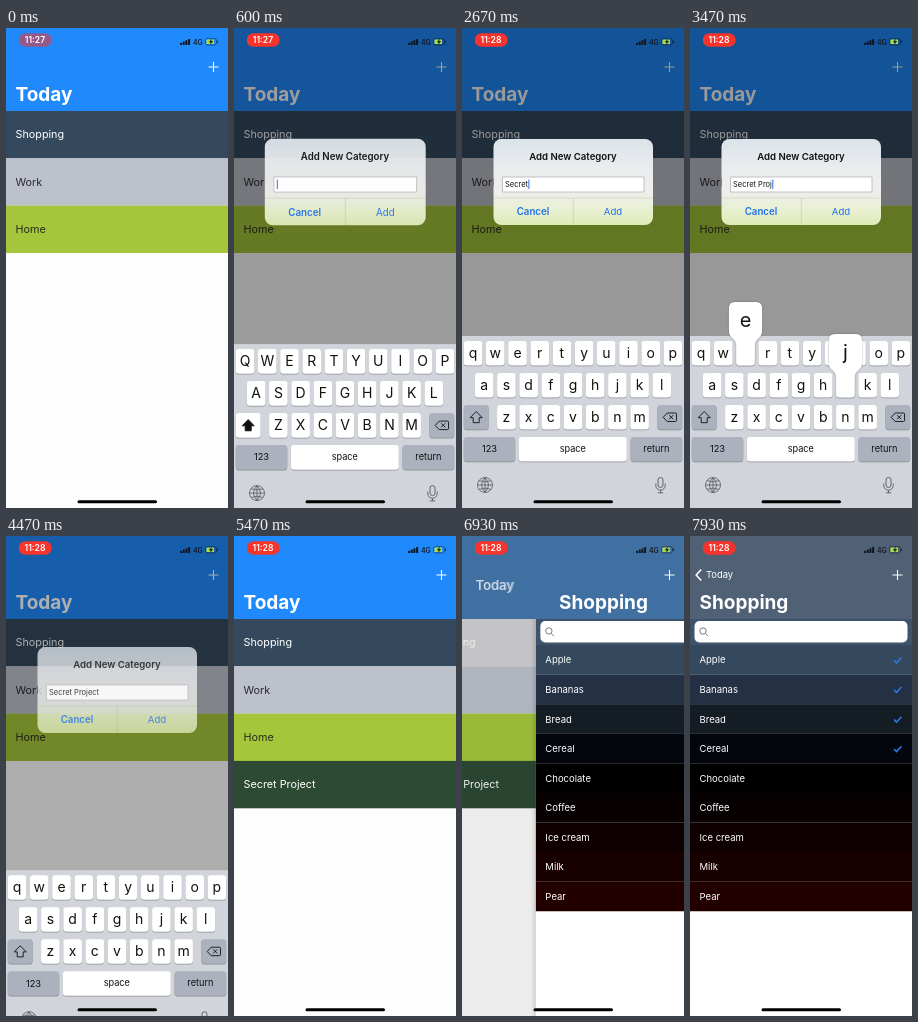
An HTML page with a canvas for the animation above (8000 ms loop, 222 by 480 pixels).

```html
<!DOCTYPE html>
<html lang="en">
<head>
<meta charset="utf-8">
<title>Todo list</title>
<style>
  html, body { margin: 0; width: 100%; height: 100%; overflow: hidden; background: #fff; }
  canvas { display: block; width: 222px; height: 480px; }
</style>
</head>
<body>
<canvas id="stage"></canvas>
<script>
const W = 222, H = 480, LOOP = 8000;
const canvas = document.getElementById('stage');
const c = canvas.getContext('2d');
const dpr = window.devicePixelRatio || 1;
canvas.width = W * dpr;
canvas.height = H * dpr;

const ALERT_IN = 250, ALERT_OUT = 4400, ROW_ADDED = 4830, ROW_TAP = 6640, PUSH = 6740;
const NAV_BLUE = [32, 138, 252], NAV_SLATE = [80, 97, 117];
const CATEGORIES = [
  ['Shopping', '#34495e', '#fff'],
  ['Work', '#bdc1cb', '#2a2a2e'],
  ['Home', '#a5c63b', '#2a2e1c'],
  ['Secret Project', '#2c4a34', '#fff']
];
const ITEMS = [
  ['Apple', '#34495e'], ['Bananas', '#243145'], ['Bread', '#141d24'],
  ['Cereal', '#03060d'], ['Chocolate', '#000'], ['Coffee', '#060000'],
  ['Ice cream', '#0e0000'], ['Milk', '#180000'], ['Pear', '#220000']
];
const CHECKED = 4;
const KEY_ROWS = [['qwertyuiop', 1.8, 313], ['asdfghjkl', 12.9, 345], ['zxcvbnm', 35.1, 377]];
const KEY_W = 18.6, KEY_H = 24.6, KEY_STEP = 22.2;
const TYPED = 'Secret Project';
const PRESSES = [1660, 1900, 2060, 2220, 2350, 2500, 2680, 2930, 3070, 3200, 3330, 3430, 3640, 3820];
const HOLD = 150, INSERT_DELAY = 70;

const mix = (a, b, p) => a + (b - a) * p;
const mixColor = (a, b, p) => `rgb(${a.map((v, i) => mix(v, b[i], p))})`;

// Critically damped spring from 0 to 1.
function spring(now, start, speed) {
  const x = Math.max(0, now - start) / 1000 * speed;
  return 1 - (1 + x) * Math.exp(-x);
}

function rect(x, y, w, h, color) {
  c.fillStyle = color;
  c.fillRect(x, y, w, h);
}

function round(x, y, w, h, r, color) {
  c.fillStyle = color;
  c.beginPath();
  c.roundRect(x, y, w, h, r);
  c.fill();
}

function stroke(path, color, width = 1) {
  c.strokeStyle = color;
  c.lineWidth = width;
  c.stroke(new Path2D(path));
}

// y is the middle of the capitals.
function text(s, x, y, size, color, weight = 400, align = 'left') {
  c.font = `${weight} ${size}px Inter, Roboto, sans-serif`;
  c.textAlign = align;
  c.fillStyle = color;
  c.fillText(s, x, y + size * 0.36);
}

function layer(alpha, draw) {
  if (alpha <= 0) return;
  c.save();
  c.globalAlpha *= Math.min(1, alpha);
  draw();
  c.restore();
}

function categoryList(now) {
  const count = now < ROW_ADDED ? 3 : 4;
  CATEGORIES.slice(0, count).forEach(([name, color, ink], i) => {
    const y = 83 + i * 47.3;
    const tapped = i === 0 && now >= ROW_TAP;
    rect(0, y, W, 47.4, tapped ? '#d2d2d4' : color);
    text(name, 9.5, y + 23.5, 10.8, ink);
  });
}

function itemList() {
  rect(0, 83, W, H, '#fff');
  rect(0, 83, W, 26.2, '#3f546a');
  round(4.5, 85, 213, 21.5, 5, '#fff');
  stroke('M16.2 95a3.2 3.2 0 1 1-6.4 0a3.2 3.2 0 1 1 6.4 0M15.3 97.4l2.8 2.8', '#6b6e78', 0.9);
  ITEMS.forEach(([name, color], i) => {
    const y = 109 + i * 29.57;
    rect(0, y, W, 29.7, color);
    text(name, 9.5, y + 15, 9.5, '#fff');
    if (i < CHECKED) stroke(`M204 ${y + 15.3}l2.5 2.6l5-5.4`, '#2a7cec', 1.5);
  });
}

function navBar(now) {
  const p = spring(now, PUSH, 12), q = spring(now, PUSH, 10.7);
  rect(0, 0, W, 83, mixColor(NAV_BLUE, NAV_SLATE, p));
  stroke('M202.5 39h10M207.5 34v10', '#fff', 1.1);

  const x = mix(9.5, 16, q), y = mix(66, 39, q), size = mix(19, 9.4, q);
  layer(1 - q, () => text('Today', x, y, size, '#fff', 700));
  layer(q, () => text('Today', x, y, size, '#fff'));
  if (q > 0) text('Shopping', 9.5 + W * (1 - q), 66, 19, '#fff', 700);
  layer((q - 0.6) / 0.4, () => stroke('M11.2 33.5l-5 5.5l5 5.5', '#fff', 1.6));
}

function screens(now) {
  const p = spring(now, PUSH, 12);
  rect(0, 0, W, H, '#fefdfe');
  c.save();
  c.translate(-0.3 * W * p, 0);
  categoryList(now);
  c.restore();
  if (p > 0) {
    const edge = W * (1 - p);
    rect(0, 83, edge, H, `rgba(0,0,0,${0.1 * p})`);
    const shade = c.createLinearGradient(edge - 5, 0, edge, 0);
    shade.addColorStop(0, 'rgba(0,0,0,0)');
    shade.addColorStop(1, 'rgba(0,0,0,.12)');
    rect(edge - 5, 83, 5, H, shade);
    c.save();
    c.translate(edge, 0);
    itemList();
    c.restore();
  }
  navBar(now);
}

function alertBox(now) {
  const glass = c.createLinearGradient(0, 111, 0, 197);
  [[0, '#dce3e9'], [0.3, '#e9ebee'], [0.62, '#eeefeb'], [0.82, '#e9f0d2'], [1, '#dfeab8']]
    .forEach(([at, color]) => glass.addColorStop(at, color));
  round(31.5, 111, 159.5, 86, 8, glass);
  text('Add New Category', 111, 129, 9.6, '#111', 600, 'center');

  rect(40.5, 149, 141.5, 15, '#fff');
  stroke('M40.5 149h141.5v15h-141.5z', '#a9abb0', 0.7);
  const count = PRESSES.filter(t => now >= t + INSERT_DELAY).length;
  const value = TYPED.slice(0, count);
  text(value, 43, 156.3, 7.5, '#111');
  const active = now < 4300 && (now - 1660) % 1000 < 600 || (now > 1660 && now < 3900);
  if (active) rect(43.4 + c.measureText(value).width, 151.5, 1, 9.5, '#2f6cf0');

  stroke('M31.5 170h159.5M111.3 170v27', 'rgba(60,70,60,.2)', 0.6);
  text('Cancel', 71, 184, 9.7, '#1f70ee', 600, 'center');
  text('Add', 151, 184, 9.6, '#1f70ee', 400, 'center');
}

function key(x, y, w, color = '#fff') {
  round(x, y + 0.7, w, KEY_H, 3, '#898c92');
  round(x, y, w, KEY_H, 3, color);
}

function keyPopup(letter, x, y) {
  const left = Math.min(Math.max(x + KEY_W / 2 - 16.6, 1.5), W - 34.7), right = left + 33.2;
  const top = y - 39, end = x + KEY_W, bottom = y + KEY_H;
  const shape = new Path2D(`M${left + 6} ${top}H${right - 6}Q${right} ${top} ${right} ${top + 6}
    V${y - 10}C${right} ${y - 2} ${end} ${y - 4} ${end} ${y + 5}V${bottom - 3}
    Q${end} ${bottom} ${end - 3} ${bottom}H${x + 3}Q${x} ${bottom} ${x} ${bottom - 3}
    V${y + 5}C${x} ${y - 4} ${left} ${y - 2} ${left} ${y - 10}V${top + 6}
    Q${left} ${top} ${left + 6} ${top}Z`);
  c.save();
  c.shadowColor = 'rgba(0,0,0,.35)';
  c.shadowBlur = 2 * dpr;
  c.fillStyle = '#fff';
  c.fill(shape);
  c.restore();
  text(letter, (left + right) / 2, y - 21, 20, '#111', 400, 'center');
}

function keyboard(now) {
  const dark = '#abb1bd';
  const upper = now < PRESSES[0] + HOLD || (now > 2840 && now < PRESSES[7] + HOLD);
  const pressed = [...TYPED].filter((_, i) => now >= PRESSES[i] && now < PRESSES[i] + HOLD);
  const popups = [];
  rect(0, 308, W, 172, '#d1d4da');

  for (const [letters, start, y] of KEY_ROWS) {
    [...letters].forEach((letter, i) => {
      const x = start + i * KEY_STEP;
      const label = upper ? letter.toUpperCase() : letter;
      key(x, y, KEY_W);
      text(label, x + KEY_W / 2, y + 11.8, 14, '#111', 400, 'center');
      const hit = pressed.find(ch => ch.toLowerCase() === letter);
      if (hit) popups.push([hit, x, y]);
    });
  }

  key(1.8, 377, 24.8, upper ? '#fff' : dark);
  const arrow = 'M14.2 383.5l6 6.2h-3v5h-6v-5h-3z';
  stroke(arrow, '#111', 0.9);
  if (upper) { c.fillStyle = '#111'; c.fill(new Path2D(arrow)); }
  key(195.4, 377, 24.8, dark);
  stroke('M205.2 385h8.3q1 0 1 1v6.5q0 1-1 1h-8.3l-4-4.2zM207.2 387.2l4 4M211.2 387.2l-4 4', '#111', 0.9);

  key(1.8, 409, 51.4, dark);
  text('123', 27.5, 421, 9.3, '#111', 400, 'center');
  key(56.8, 409, 108, pressed.includes(' ') ? dark : '#fff');
  text('space', 110.8, 420.3, 9.2, '#111', 400, 'center');
  key(168.6, 409, 51.6, dark);
  text('return', 194.4, 420.8, 9.2, '#111', 400, 'center');

  stroke(`M30.5 457a7.5 7.5 0 1 1-15 0a7.5 7.5 0 1 1 15 0M15.5 457h15M23 449.5v15
    M23 449.5q-7 7.5 0 15q7-7.5 0-15M17 452.6q6 2.6 12 0M17 461.4q6-2.6 12 0`, '#555a63', 0.8);
  stroke(`M196 452a2.5 2.5 0 0 1 5 0v5a2.5 2.5 0 0 1-5 0z
    M193.8 455.5v2a4.7 4.7 0 0 0 9.4 0v-2M198.5 462.2v2.6M195.8 464.8h5.4`, '#555a63', 0.9);
  popups.forEach(args => keyPopup(...args));
}

function statusBar(now) {
  layer(mix(0.55, 1, Math.min(1, now / 500)), () => round(12.7, 5.2, 33, 13.6, 6.8, '#f5342c'));
  text(now < 900 ? '11:27' : '11:28', 29, 12, 8.6, '#fff', 600, 'center');
  const ink = '#10151f';
  for (let i = 0; i < 4; i++) round(174 + i * 2.7, 14.8 - i * 1.3, 2, 2.2 + i * 1.3, 0.5, ink);
  text('4G', 187, 14, 7, ink, 500);
  c.strokeStyle = 'rgba(16,21,31,.7)';
  c.lineWidth = 0.6;
  c.beginPath();
  c.roundRect(199.5, 10.6, 11, 6.4, 1.7);
  c.stroke();
  round(200.4, 11.5, 7.6, 4.6, 0.9, '#a6e04c');
  rect(211.2, 12.7, 0.8, 2.2, ink);
  c.fillStyle = ink;
  c.fill(new Path2D('M205.8 10.8l-3 3.4h2l-.8 2.7l3.2-3.6h-2z'));
}

function render(now) {
  c.setTransform(dpr, 0, 0, dpr, 0, 0);
  screens(now);

  const shown = spring(now, ALERT_IN, 14), gone = spring(now, ALERT_OUT, 12);
  const presence = shown * (1 - gone);
  if (presence > 0.002) {
    rect(0, 0, W, H, `rgba(0,0,0,${0.4 * presence})`);
    const scale = mix(1.2, 1, shown);
    layer(presence, () => {
      c.translate(111, 154);
      c.scale(scale, scale);
      c.translate(-111, -154);
      alertBox(now);
    });
  }

  const drop = 172 * (1 - spring(now, ALERT_IN + 30, 15) + spring(now, ALERT_OUT + 25, 15));
  if (drop < 171.5) {
    c.save();
    c.translate(0, drop);
    keyboard(now);
    c.restore();
  }
  statusBar(now);
  round(71.5, 472.3, 79.5, 3, 1.5, '#000');
}

const begin = performance.now();
function tick() {
  render((performance.now() - begin) % LOOP);
  requestAnimationFrame(tick);
}
tick();
</script>
</body>
</html>
```
